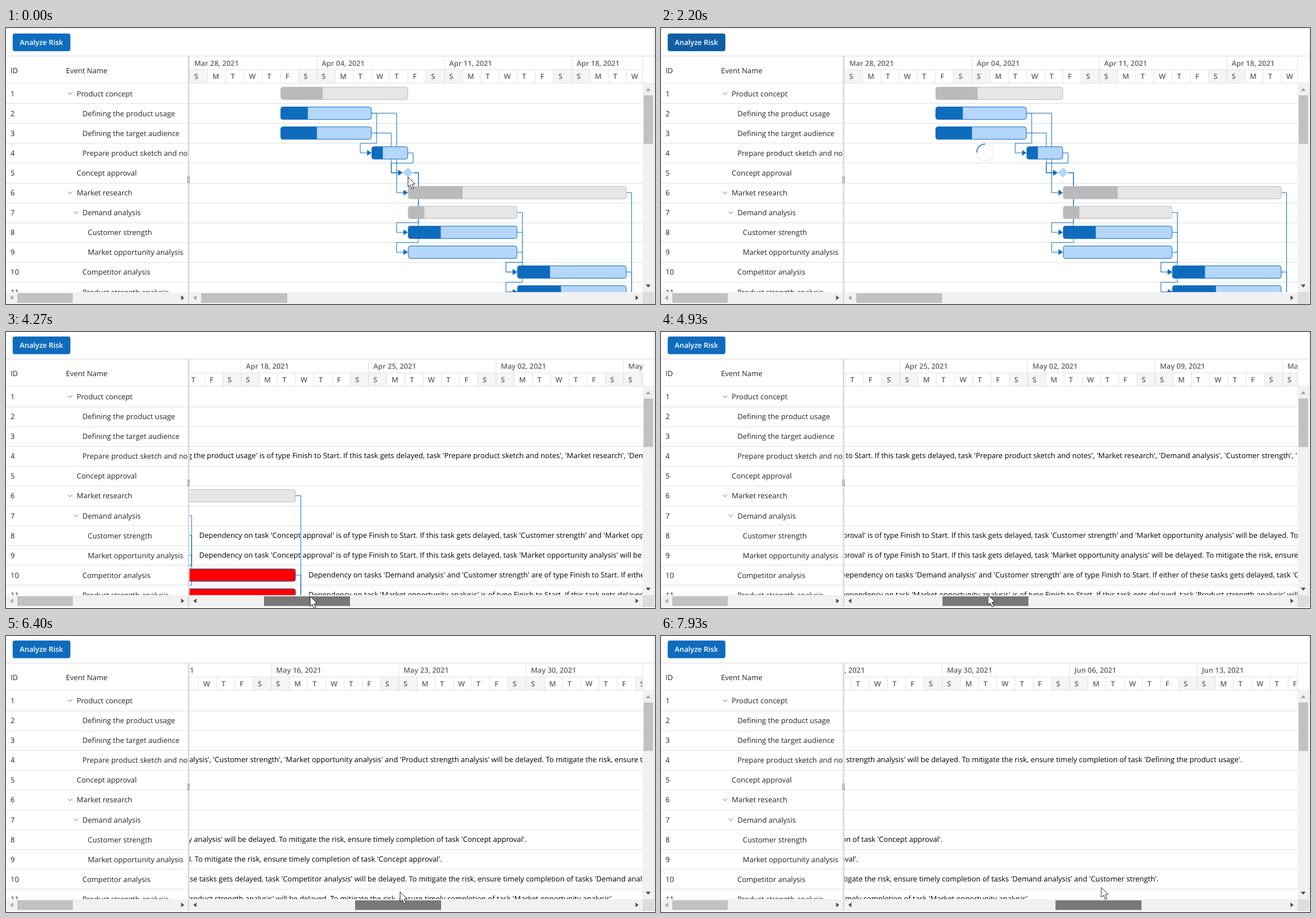
Animation of 1147x488 px, one loop 8000 ms. Source, as an HTML page with a canvas:

```html
<!DOCTYPE html>
<html lang="en">
<head>
<meta charset="utf-8">
<title>Gantt risk analysis</title>
<style>
html, body { margin: 0; width: 100%; height: 100%; overflow: hidden; background: #fff; }
canvas { display: block; }
</style>
</head>
<body>
<canvas id="stage" width="1147" height="488"></canvas>
<script>
const ctx = document.getElementById('stage').getContext('2d');
const STEPS = 120, STEP_MS = 8000 / STEPS;
const PRESS = 15, RELEASE = 18, LOADED = 43, GRAB = 53;
const FONT = '12.97px "Open Sans", "Noto Sans", sans-serif';
const BOLD = '600 12.8px "Open Sans", "Noto Sans", sans-serif';
const BLUE = '#0f6cbd', LIGHT = '#b4d6fa', LINE = '#e0e0e0', INK = '#242424';
const LEFT = 324.3, RIGHT = 1125, TOP = 98, ROW = 35.1, DAY = 32.18;
const SCROLL_RATIO = 5.266;
const MONTHS = ['Mar', 'Apr', 'May', 'Jun', 'Jul'];

const risk = (on, delayed, verb = 'is', when = 'this task') =>
  `Dependency on ${on} ${verb} of type Finish to Start. If ${when} gets delayed, task ${delayed} ` +
  `will be delayed. To mitigate the risk, ensure timely completion of ${on}.`;

// start and end are days after the first Sunday
const tasks = [
  { name: 'Product concept', indent: 125, start: 5, end: 12, done: .33, parent: true },
  { name: 'Defining the product usage', indent: 135, start: 5, end: 10, done: .3 },
  { name: 'Defining the target audience', indent: 135, start: 5, end: 10, done: .4 },
  { name: 'Prepare product sketch and notes', indent: 135, start: 10, end: 12, done: .31,
    risk: risk("task 'Defining the product usage'", "'Prepare product sketch and notes', 'Market research', " +
      "'Demand analysis', 'Customer strength', 'Market opportunity analysis' and 'Product strength analysis'") },
  { name: 'Concept approval', indent: 125, start: 12, milestone: true },
  { name: 'Market research', indent: 125, start: 12, end: 24, done: .25, parent: true },
  { name: 'Demand analysis', indent: 135, start: 12, end: 18, done: .15, parent: true },
  { name: 'Customer strength', indent: 144.5, start: 12, end: 18, done: .3,
    risk: risk("task 'Concept approval'", "'Customer strength' and 'Market opportunity analysis'") },
  { name: 'Market opportunity analysis', indent: 144.5, start: 12, end: 18, done: 0,
    risk: risk("task 'Concept approval'", "'Market opportunity analysis'") },
  { name: 'Competitor analysis', indent: 135, start: 18, end: 24, done: .3,
    risk: risk("tasks 'Demand analysis' and 'Customer strength'", "'Competitor analysis'", 'are', 'either of these tasks') },
  { name: 'Product strength analysis', indent: 135, start: 18, end: 24, done: .4,
    risk: risk("task 'Market opportunity analysis'", "'Product strength analysis'") }
];

// predecessor row, successor row
const links = [[1, 3], [1, 5], [2, 4], [3, 4], [4, 7], [4, 8], [6, 9], [7, 9], [8, 10]];

// step, offset
const thumbKeys = [[55, 0], [64, 111], [66, 122], [69, 122], [83, 207.2], [96, 272], [109, 311], [119, 352.2]];

// step, x, y
const cursorIn = [[0, 710, 263], [1, 241, 55], [4, 241, 55], [11, 62, 24], [17, 62, 24], [26, 440, 489]];
const cursorDrag = [[43, 416, 489], [48, 422.5, 468], [55, 422.5, 468], [64, 537, 467], [66, 547, 467],
  [69, 547, 467], [83, 632, 460], [96, 696, 452], [109, 735.5, 447], [119, 777.5, 444]];

function track(keys, step, col = 1) {
  if (step <= keys[0][0]) return keys[0][col];
  for (let i = 1; i < keys.length; i++) {
    const a = keys[i - 1], b = keys[i];
    if (step <= b[0]) return a[col] + (b[col] - a[col]) * (step - a[0]) / (b[0] - a[0]);
  }
  return keys[keys.length - 1][col];
}

const dayX = d => LEFT + d * DAY;
const rowY = r => TOP + ROW * (r + .5);

function rect(x, y, w, h, color) {
  ctx.fillStyle = color;
  ctx.fillRect(x, y, w, h);
}

function text(str, x, y, color = INK, font = FONT) {
  ctx.font = font;
  ctx.fillStyle = color;
  ctx.fillText(str, x, y);
}

function poly(points, fill, stroke) {
  ctx.beginPath();
  points.forEach(([x, y]) => ctx.lineTo(x, y));
  if (fill) {
    ctx.closePath();
    ctx.fillStyle = fill;
    ctx.fill();
  }
  if (stroke) {
    ctx.strokeStyle = stroke;
    ctx.stroke();
  }
}

function clipped(x, y, w, h, draw) {
  ctx.save();
  ctx.beginPath();
  ctx.rect(x, y, w, h);
  ctx.clip();
  draw();
  ctx.restore();
}

function triangle(x, y, dx, dy, color) {
  const s = 4.2;
  poly([[x + dx * 3, y + dy * 3], [x - dx * 2.5 + dy * s, y - dy * 2.5 + dx * s],
    [x - dx * 2.5 - dy * s, y - dy * 2.5 - dx * s]], color);
}

function button(color) {
  ctx.beginPath();
  ctx.roundRect(11.8, 9.7, 102, 31.2, 4);
  ctx.fillStyle = color;
  ctx.fill();
  text('Analyze Risk', 24.3, 30, '#fff', BOLD);
}

// Row separators sit on whole pixels in both layouts
function rowLines(x, w, dy) {
  for (let r = 1; r < 11; r++) rect(x, Math.round(TOP + ROW * r + dy) - dy, w, 1, LINE);
}

function grid(dy) {
  text('ID', 8, 80);
  text('Event Name', 106, 80);
  clipped(0, TOP, 321, 369, () => {
    rowLines(0, 321, dy);
    tasks.forEach((task, r) => {
      const y = rowY(r) + 5;
      text(r + 1, 8, y);
      text(task.name, task.indent, y);
      if (task.parent) {
        const x = task.indent - 11.7;
        poly([[x - 3.8, y - 6.8], [x, y - 3], [x + 3.8, y - 6.8]], null, '#616161');
      }
    });
  });
}

function timeline(scroll) {
  clipped(LEFT, 49, RIGHT - LEFT, 50, () => {
    ctx.translate(-scroll, 0);
    for (let w = 0; w < 16; w++) {
      const date = new Date(Date.UTC(2021, 2, 28 + w * 7));
      const label = `${MONTHS[date.getUTCMonth() - 2]} ${String(date.getUTCDate()).padStart(2, '0')}, 2021`;
      for (let d = 0; d < 7; d++) {
        const x = dayX(w * 7 + d);
        if (d % 6 === 0) rect(x, 74, DAY, 23.5, '#f5f5f5');
        rect(x - .5, 74, 1, 24, LINE);
        text('SMTWTFS'[d], x + 8.5, 90.2, '#616161', BOLD);
      }
      rect(dayX(w * 7) - .5, 50, 1, 48, LINE);
      text(label, dayX(w * 7) + 8.5, 66.5, '#616161', BOLD);
    }
  });
  rect(LEFT, 73.3, RIGHT - LEFT, 1, LINE);
  rect(RIGHT - .5, 50, 1, 48, LINE);
}

function link(x1, r1, x2, r2) {
  const y1 = rowY(r1), y2 = rowY(r2), back = x2 - 20;
  const points = [[x1, y1]];
  if (x2 - x1 > 30) points.push([back, y1]);
  else {
    const turn = TOP + ROW * r2 + .5;
    points.push([x1 + 9, y1], [x1 + 9, turn], [back, turn]);
  }
  points.push([back, y2], [x2 - 6, y2]);
  poly(points, null, BLUE);
  poly([[x2, y2], [x2 - 8, y2 - 5], [x2 - 8, y2 + 5]], BLUE);
}

function bar(task, r, risky) {
  const x = dayX(task.start), y = rowY(r) - 11.5;
  if (task.milestone) {
    const c = y + 11;
    poly([[x, c - 9], [x + 9, c], [x, c + 9], [x - 9, c]], LIGHT);
    return;
  }
  const w = dayX(task.end) - x, alarm = risky && task.risk;
  ctx.beginPath();
  ctx.roundRect(x + .3, y + .3, w - .6, 22.4, 4);
  ctx.save();
  ctx.clip();
  rect(x, y, w, 23, alarm ? '#f00' : task.parent ? '#e6e6e6' : LIGHT);
  if (!alarm) rect(x, y, w * task.done, 23, task.parent ? '#bababa' : BLUE);
  ctx.restore();
  ctx.beginPath();
  ctx.roundRect(x + .5, y + .5, w - 1, 22, 4);
  ctx.strokeStyle = task.parent ? '#bdbdbd' : BLUE;
  ctx.stroke();
}

function chart(scroll, risky, dy) {
  clipped(LEFT, TOP, RIGHT - LEFT, 369, () => {
    rowLines(LEFT, RIGHT - LEFT, dy);
    ctx.translate(-scroll, 0);
    links.forEach(([a, b]) => {
      const from = tasks[a], to = tasks[b];
      link(from.milestone ? dayX(from.start) + 9.5 : dayX(from.end), a,
        to.milestone ? dayX(to.start) - 9.5 : dayX(to.start), b);
    });
    [5, 9].forEach(r => link(dayX(24), r, dayX(24), 12));
    tasks.forEach((task, r) => bar(task, r, risky));
    if (risky) {
      tasks.forEach((task, r) => {
        if (task.risk) text(task.risk, dayX(task.end) + 22.5, rowY(r) + 4, '#000');
      });
    }
  });
}

function scrollbars(thumb, pressed) {
  const dark = '#505050', pale = '#a3a3a3', bg = '#f1f1f1', knob = '#c1c1c1';
  rect(0, 467, 321.5, 21, bg);
  rect(20, 469, 98, 17, knob);
  triangle(10, 477, -1, 0, pale);
  triangle(312, 477, 1, 0, dark);
  rect(LEFT, 467, RIGHT - LEFT, 21, bg);
  rect(345 + thumb, 469, 152, 17, pressed ? '#787878' : knob);
  triangle(334, 477, -1, 0, thumb ? dark : pale);
  triangle(1115, 477, 1, 0, dark);
  rect(RIGHT, TOP, 20, 369, bg);
  rect(1127, 119, 16.5, 86, knob);
  triangle(1135, 109, 0, -1, pale);
  triangle(1135, 456, 0, 1, dark);
  rect(RIGHT, 467, 20, 21, '#dcdcdc');
}

function splitter() {
  rect(321.3, 50, 2.8, 438, '#dadada');
  rect(320.5, 261, 4.5, 15, '#fff');
  rect(321, 262, 1, 13, '#616161');
  rect(323.5, 262, 1, 13, '#616161');
}

function spinner(step) {
  const a = Math.PI + (step - 33) / 19.5 * Math.PI * 2;
  ctx.lineWidth = 1.6;
  [[0, Math.PI * 2, '#ececec'], [a, a + Math.PI / 2, BLUE]].forEach(([from, to, color]) => {
    ctx.beginPath();
    ctx.arc(573, 220, 14.8, from, to);
    ctx.strokeStyle = color;
    ctx.stroke();
  });
  ctx.lineWidth = 1;
}

function cursor(x, y) {
  ctx.save();
  ctx.translate(x + .5, y + .5);
  poly([[0, 0], [0, 17.5], [4, 13.9], [7, 21], [10, 19.7], [7, 12.8], [12.5, 12.5]], '#fff', '#222');
  ctx.restore();
}

// The button keeps its focus colour until the result loads
function buttonColor(step, x) {
  if (step >= LOADED) return BLUE;
  if (step >= PRESS && step < RELEASE) return '#0c3b5e';
  return step >= RELEASE || x < 114 ? '#115ea3' : BLUE;
}

function draw(step) {
  const risky = step >= LOADED, dy = risky ? -1.6 : 0;
  const thumb = track(thumbKeys, step), scroll = thumb * SCROLL_RATIO;
  const keys = risky ? cursorDrag : cursorIn;
  const x = track(keys, step), y = track(keys, step, 2);

  ctx.lineWidth = 1;
  rect(0, 0, 1147, 488, '#fff');
  ctx.save();
  ctx.translate(0, dy);
  rect(0, 0, 1146, 1, LINE);
  rect(1145, 0, 1, 488, LINE);
  rect(0, 49, 1145, 1, '#d6d6d6');
  button(buttonColor(step, x));
  grid(dy);
  timeline(scroll);
  rect(0, 97, 1145, 1, LINE);
  chart(scroll, risky, dy);
  scrollbars(thumb, step >= GRAB);
  splitter();
  ctx.restore();

  if (step >= RELEASE && !risky) spinner(step);
  if (y < 488) cursor(x, y);
}

function frame(now) {
  // A few ms of lead absorbs timer rounding at step edges
  draw(Math.floor((now + 5) / STEP_MS) % STEPS);
  requestAnimationFrame(frame);
}

ctx.textRendering = 'geometricPrecision';
requestAnimationFrame(frame);
</script>
</body>
</html>
```
